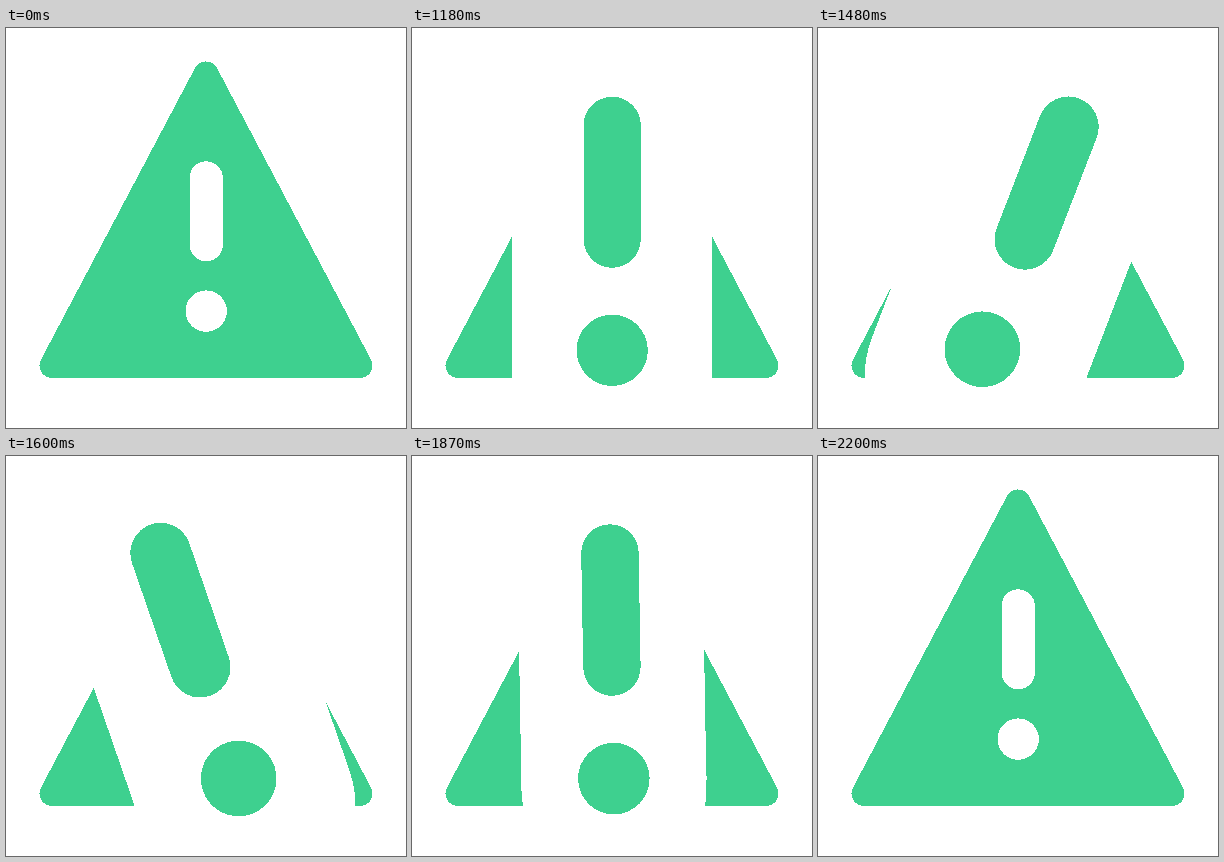
An HTML page for the animation above (2230 ms loop, 400 px wide and 400 px high).

```html
<!DOCTYPE html>
<html lang="en">
<head>
<meta charset="utf-8">
<title>Alert</title>
<style>
  html, body { margin: 0; width: 100%; height: 100%; overflow: hidden; background: #fff; }
  svg { display: block; width: 100vw; height: 100vh; shape-rendering: crispEdges; }
  line { stroke-linecap: round; }
</style>
</head>
<body>
<svg viewBox="0 0 400 400">
  <path d="M200 46 354 337.5H46Z" fill="#3ed08f" stroke="#3ed08f" stroke-width="25" stroke-linejoin="round"/>
  <g id="mark">
    <g id="halo"><line stroke="#fff"/><circle fill="#fff"/></g>
    <g id="core"><line stroke="#3ed08f"/><circle fill="#3ed08f"/></g>
  </g>
</svg>
<script>
const LOOP = 2230, START = 1000, END = 1200, STEP = 30;
const PIVOT = 227.5, BAR_Y = -44.2, DOT_Y = 55.6;

// Shake: [time, angle]
const SHAKE = [[255, 0], [378, -25], [501, 25], [627, -25], [903, 0]];

const mark = document.getElementById('mark');
const halo = document.getElementById('halo');
const core = document.getElementById('core');

const clamp = x => Math.min(1, Math.max(0, x));
const smooth = x => x * x * (3 - 2 * x);
const cubic = x => x < .5 ? 4 * x ** 3 : 1 - 4 * (1 - x) ** 3;
const ramp = (t, from, to) => cubic(clamp((t - from) / (to - from)));
const mix = (a, b, p) => a + (b - a) * p;

function angleAt(t) {
  for (let i = 1; i < SHAKE.length; i++) {
    const [t0, a0] = SHAKE[i - 1], [t1, a1] = SHAKE[i];
    if (t < t1) return mix(a0, a1, smooth(clamp((t - t0) / (t1 - t0))));
  }
  return 0;
}

function set(el, attrs) {
  for (const key in attrs) el.setAttribute(key, attrs[key]);
}

// Exclamation mark: bar radius, half the bar's inner length, dot radius
function shape(group, barR, half, dotR) {
  const [bar, dot] = group.children;
  set(bar, { x1: 0, x2: 0, y1: BAR_Y - half, y2: BAR_Y + half, 'stroke-width': 2 * barR });
  set(dot, { cx: 0, cy: DOT_Y, r: dotR });
}

function draw(t) {
  const back = ramp(t, 722, 1195);
  const grow = ramp(t, 0, 264) - back;
  const spread = ramp(t, 0, 212) - back;
  const fill = ramp(t, 30, 180) - ramp(t, 865, 1140);
  const shift = t > 0 && t < END ? 1.2 : 0;

  set(mark, {
    transform: `translate(200.2 ${PIVOT + shift}) rotate(${angleAt(t)}) scale(${mix(1, 1.785, grow)})`
  });
  shape(halo, mix(16.67, 60.1, spread), mix(33.33, 116, spread), mix(20.7, 59.7, spread));
  core.style.display = fill > .001 ? '' : 'none';
  shape(core, 17 * fill, 33.8 * fill, 21.2 * fill);
}

const begin = performance.now();
function tick() {
  const t = (performance.now() - begin) % LOOP - START;
  draw(Math.max(0, Math.floor(t / STEP) * STEP));
  requestAnimationFrame(tick);
}
tick();
</script>
</body>
</html>
```
